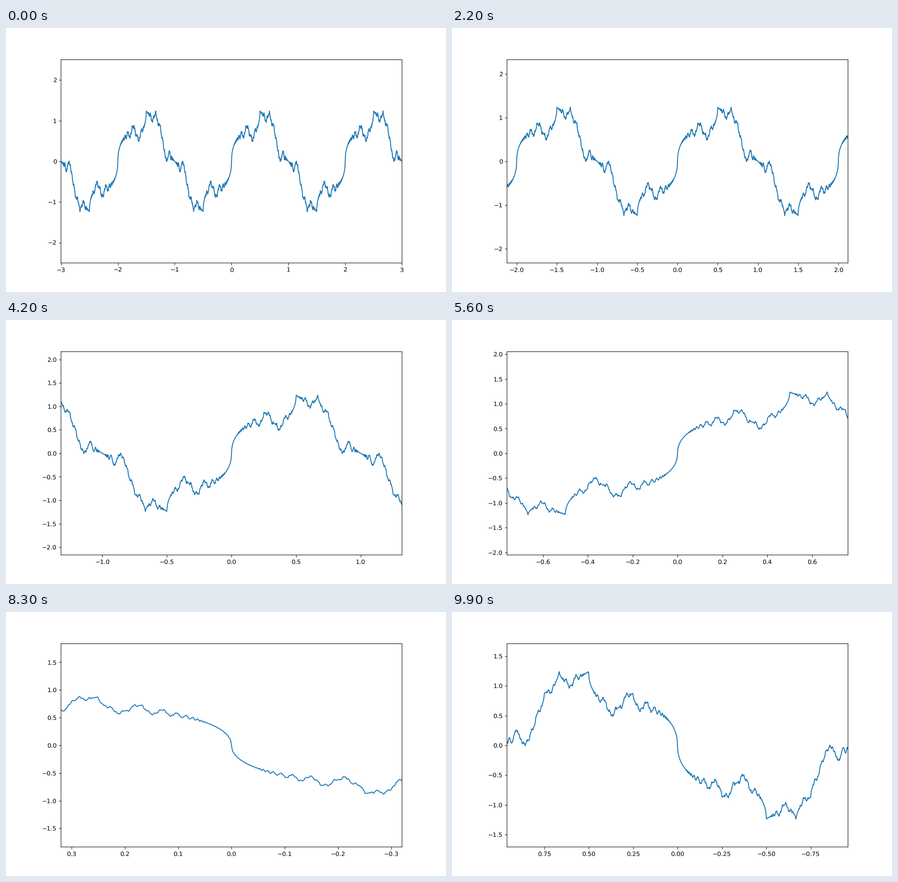
A matplotlib script for the animation above (10000 ms loop, 966 by 580 pixels).

```python
import numpy as np
import matplotlib.pyplot as plt
from matplotlib.animation import FuncAnimation

FRAMES = 100
TERMS = 20
SCALE = 0.966  # a 10 x 6 inch figure shrunk to the stage


def riemann(x, terms=TERMS):
    """Partial sum of sin(n^2 pi x) / n^2."""
    n2 = np.arange(1, terms + 1)[:, None] ** 2
    return (np.sin(n2 * np.pi * x) / n2).sum(axis=0)


plt.rcParams.update({
    "font.family": "DejaVu Sans",
    "font.size": 10 * SCALE,
    "text.hinting": "no_hinting",
    "axes.linewidth": 0.8 * SCALE,
    "lines.linewidth": 1.5 * SCALE,
})
for axis in ("xtick", "ytick"):
    plt.rcParams.update({
        f"{axis}.major.size": 3.5 * SCALE,
        f"{axis}.major.width": 0.8 * SCALE,
        f"{axis}.major.pad": 3.5 * SCALE,
    })

fig, ax = plt.subplots(figsize=(9.66, 5.8), dpi=100)
fig.subplots_adjust(left=0.125, right=0.9, bottom=0.11, top=0.88)
for spine in ax.spines.values():
    spine.set_snap(False)

x = np.linspace(-3, 3, 6001)
ax.plot(x, riemann(x), color="#1f77b4")


def update(i):
    # The x window shrinks through zero and comes out mirrored.
    half_x = round(3 - 0.04 * i, 6) or 0.05
    half_y = 2.5 - 0.008 * i
    ax.set_xlim(-half_x, half_x)
    ax.set_ylim(-half_y, half_y)
    return ax.lines


anim = FuncAnimation(fig, update, frames=FRAMES, interval=100,
                     repeat=True, repeat_delay=0)
plt.show()
```
